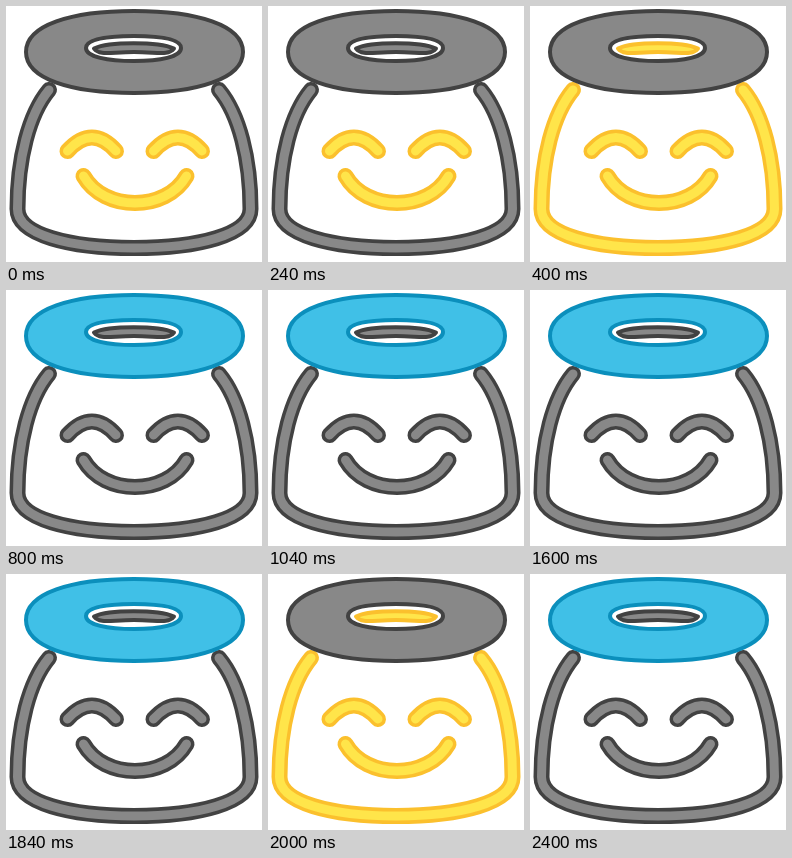
Recreate the animation shown at these times as an HTML page. Size 256x256 px, loop 2.8 s.

```html
<!DOCTYPE html>
<html lang="en">
<head>
<meta charset="utf-8">
<title>Halo face</title>
<style>
  html, body { margin: 0; width: 100%; height: 100%; overflow: hidden; background: #fff; }
  svg { display: block; width: 100vw; height: 100vh; }
  .halo, .body, .face {
    --fill: #888; --edge: #424242;
    animation: 2800ms step-end infinite;
  }
  .halo { animation-name: halo; }
  .body { animation-name: body; }
  .face { animation-name: face; }
  .shape { fill: var(--fill); stroke: var(--edge); stroke-width: 4; stroke-linejoin: round; }
  .line { fill: none; stroke-linecap: round; stroke-linejoin: round; }
  .outer { stroke: var(--edge); stroke-width: 16; }
  .inner { stroke: var(--fill); stroke-width: 9; }

  /* Seven equal beats: a resting pose, then three flashes. */
  @keyframes halo {
    0%, 14.2857%, 42.8571%, 71.4286% { --fill: #888; --edge: #424242; }
    28.5714%, 57.1429%, 85.7143%, 100% { --fill: #40c0e7; --edge: #0b8fbc; }
  }
  @keyframes body {
    0%, 28.5714%, 57.1429%, 85.7143%, 100% { --fill: #888; --edge: #424242; }
    14.2857%, 42.8571%, 71.4286% { --fill: #ffe54a; --edge: #fbc02d; }
  }
  @keyframes face {
    0%, 14.2857%, 42.8571%, 71.4286% { --fill: #ffe54a; --edge: #fbc02d; }
    28.5714%, 57.1429%, 85.7143%, 100% { --fill: #888; --edge: #424242; }
  }
</style>
</head>
<body>
<svg viewBox="0 0 256 256">
  <defs>
    <path id="jar" d="M43 84C23 108 11.500 153 11.500 203C11.500 229 64 242 128 242S244.500 229 244.500 203C244.500 153 233 108 213 84"/>
    <g id="features">
      <path d="M61.500 145Q86 118 110 145"/>
      <path d="M147.500 145Q172 118 196 145"/>
      <path d="M77.500 170C98 206 160 206 180.500 170"/>
    </g>
  </defs>
  <g class="body">
    <use href="#jar" class="line outer"/>
    <use href="#jar" class="line inner"/>
  </g>
  <g class="halo">
    <path class="shape" fill-rule="evenodd" d="M20 46C20 19 65 5 128 5S237 19 237 46S191 87 128 87S20 73 20 46ZM80 42C80 33 101 30 128 30S175 33 175 42S154 55 128 55S80 51 80 42Z"/>
  </g>
  <g class="body">
    <path class="shape" d="M88 42.500C103 35.500 152 35.500 168 42.500C162 50 152 46 128 46S94 50 88 42.500Z"/>
  </g>
  <g class="face">
    <use href="#features" class="line outer"/>
    <use href="#features" class="line inner"/>
  </g>
</svg>
</body>
</html>
```
